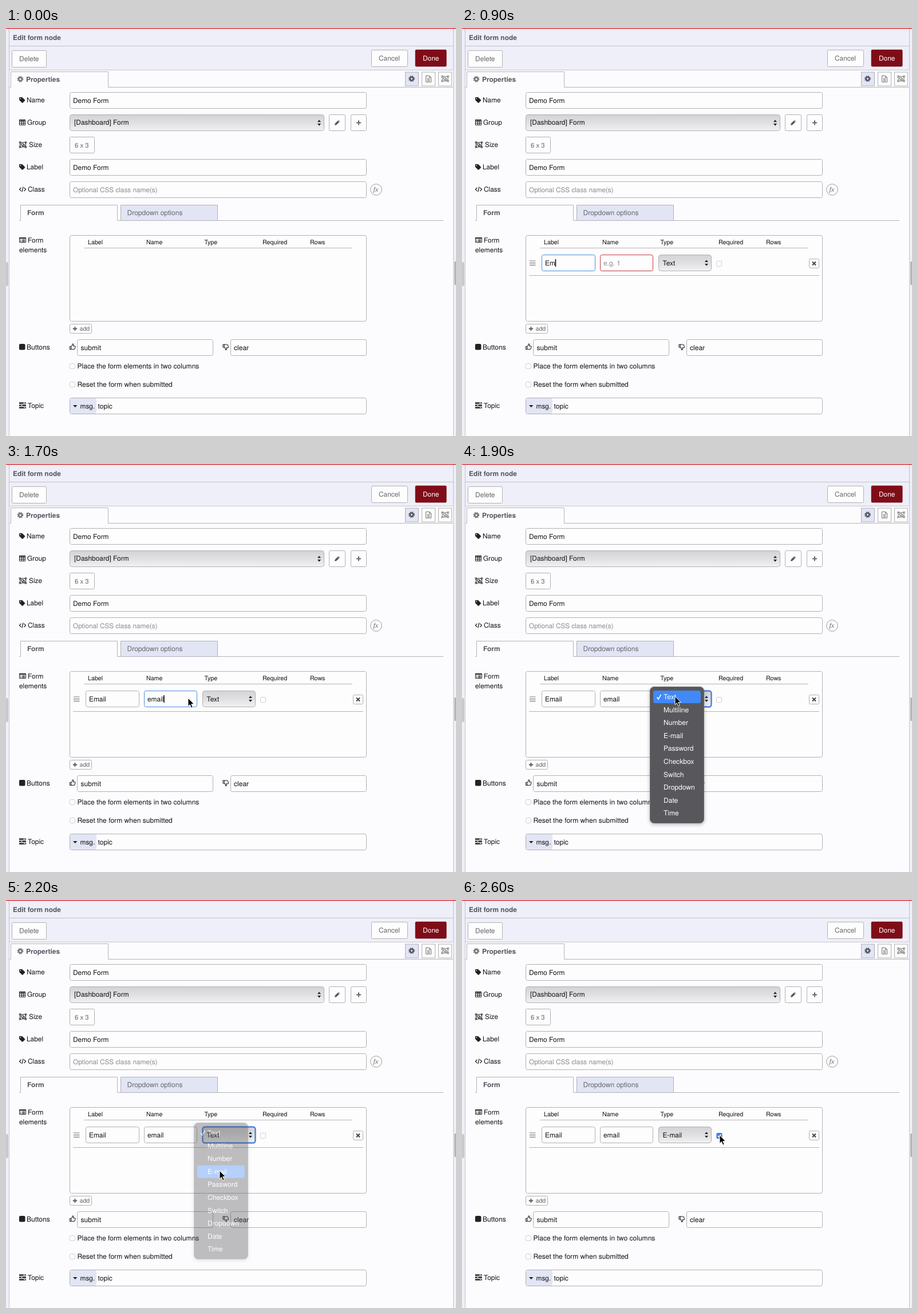
Recreate the animation shown at these times as an HTML page. Size 786 px wide and 713 px high, loop 2700 ms.

```html
<!DOCTYPE html>
<html lang="en">
<head>
<meta charset="utf-8">
<title>Edit form node</title>
<style>
  html, body { margin: 0; width: 100%; height: 100%; overflow: hidden; background: #fcfcfe; }
  svg { display: block; width: 786px; height: 713px; }
  text { font: 11.9px "Helvetica Neue", "Liberation Sans", Arial, sans-serif; fill: #111; white-space: pre; text-rendering: geometricPrecision; }
  .bold { font-weight: bold; fill: #555560; }
  .head { font-size: 10.7px; }
  .soft { fill: #66666c; }
  .hint { fill: #8b8b90; }
  .white { fill: #fff; }
  .wide { font-size: 12.07px; }
  .box { fill: #fdfdfe; stroke: #b1b1b5; }
  .tick { fill: #fdfdfe; stroke: #cfcfd3; }
  .tab { fill: #e2e5f4; stroke: #b1b1ba; }
  .line { fill: none; stroke: #b4b4b9; }
  .ink { fill: none; stroke: #222; }
  .gray { fill: none; stroke: #777; }
</style>
</head>
<body>
<svg id="stage" viewBox="0 0 786 713" xmlns="http://www.w3.org/2000/svg">
  <defs>
    <linearGradient id="metal" x2="0" y2="1">
      <stop offset="0" stop-color="#d3d3d5"/>
      <stop offset=".5" stop-color="#e0e0e2"/>
      <stop offset="1" stop-color="#f1f1f3"/>
    </linearGradient>
    <filter id="shade" x="-20%" y="-10%" width="140%" height="125%">
      <feDropShadow dx="0" dy="2" stdDeviation="3" flood-opacity=".28"/>
    </filter>
    <g id="gear">
      <circle r="2.9" fill="none" stroke="currentColor" stroke-width="2.5"/>
      <circle r="4.5" fill="none" stroke="currentColor" stroke-width="1.8" stroke-dasharray="1.9 1.634"/>
    </g>
    <g id="tag">
      <path d="M0 1Q0 0 1 0H4.4Q5.2 0 6 .8L10 4.8Q10.6 5.5 10 6.1L6.3 9.8Q5.6 10.4 5 9.8L.7 5.6Q0 4.8 0 4Z" fill="#222"/>
      <circle cx="2.3" cy="2.3" r=".9" fill="#fcfcfe"/>
    </g>
    <g id="group" fill="none" stroke="currentColor">
      <path d="M1.5 1.5H11.5V9.5H1.5Z"/>
      <path d="M3.5 3.5H7.5V6.5H3.5ZM5.5 6.5V8H9.5V5H7.5"/>
      <path d="M.2.2H2.6V2.6H.2ZM10.4.2H12.8V2.6H10.4ZM.2 8.4H2.6V10.8H.2ZM10.4 8.4H12.8V10.8H10.4Z" stroke-width=".8"/>
    </g>
    <path id="thumb" d="M.6 5H2.8V10H.6ZM2.8 5.2Q4.8 4 5 1Q5.2.4 6 .6Q7.6 1.4 6.4 4.2H9.2Q10.3 4.6 9.8 5.7Q10 6.8 9.4 7.4Q9.4 8.6 8.7 8.9Q8.5 10 7.4 10H5.4Q4 9.8 2.8 9.2" fill="none" stroke="#222" stroke-width="1.1"/>
    <path id="arrows" d="M0 3.8L3 0L6 3.8ZM0 6.6H6L3 10.4Z" fill="#222"/>
    <path id="plus" d="M-4 0H4M0-4V4" fill="none" stroke="currentColor" stroke-width="2"/>
  </defs>
  <g id="form"></g>
  <g id="row"></g>
  <g id="menu" filter="url(#shade)"></g>
  <path id="pointer" d="M0 0V14.6L3.3 11.5L5.7 17.2L8.2 16.1L5.8 10.6H10.4Z" fill="#000" stroke="#fff" stroke-width="1"/>
</svg>
<script>
const $ = id => document.getElementById(id);
const text = (x, y, s, cls = '', more = '') => `<text x="${x}" y="${y}" class="${cls}" ${more}>${s}</text>`;
const rect = (x, y, w, h, cls = 'box', r = 3, more = '') =>
  `<rect x="${x + .5}" y="${y + .5}" width="${w}" height="${h}" rx="${r}" class="${cls}" ${more}/>`;
const path = (d, cls = 'line', more = '') => `<path d="${d}" class="${cls}" ${more}/>`;
const fill = (x, y, w, h, color, r = 0) => `<rect x="${x}" y="${y}" width="${w}" height="${h}" rx="${r}" fill="${color}"/>`;
const icon = (id, x, y, color = '#222', turn = '') =>
  `<use href="#${id}" transform="translate(${x} ${y}) ${turn}" color="${color}"/>`;
const metal = (x, y, w, h, more = '') => rect(x, y, w, h, '', 4, `fill="url(#metal)" stroke="#b1b1b5" ${more}`);

const frame = [
  fill(0, 0, 786, 713, '#fcfcfe'),
  fill(0, 0, 786, 73, '#eeeff8'),
  fill(0, 0, 5, 713, '#eeeff8'), fill(782, 0, 4, 713, '#eeeff8'),
  path('M5.5 1V713M781.5 1V713M6 31.5H781M6 73.5H781', 'line', 'stroke-opacity=".75"'),
  fill(0, 0, 786, 1.3, '#d81f26'),
  fill(0, 409, 4, 42, '#c8c8ce', 1.5), fill(783, 408, 3, 41, '#b4b4bb', 1),
  text(12, 20.5, 'Edit form node', 'bold'),
  rect(10, 39, 60, 29, 'box', 2), text(23, 58, 'Delete', 'soft wide'),
  rect(638, 38, 63, 29, 'box', 2), text(651, 57, 'Cancel', 'soft'),
  fill(714.7, 37.7, 54.8, 29.8, '#7f0d17', 2), text(728, 57, 'Done', 'white'),
  path('M6 103.5H8.5V76.5H178.5V103.5H781'),
  icon('gear', 25, 89.3, '#777'), text(35, 93.7, 'Properties', 'bold'),
  rect(697, 76.6, 23, 24, 'tab', 0), icon('gear', 708.5, 88.6, '#55555f'),
  rect(726, 76.6, 23, 24, 'box', 0), rect(755, 76.6, 23, 24, 'box', 0),
  path('M733.5 83.5H739.5L742.5 86.5V94.5H733.5ZM739.5 83.5V86.5H742.5M735.5 88.5H740.5M735.5 90.5H740.5M735.5 92.5H740.5', 'gray'),
  icon('group', 760.5, 83.2, '#777')
];

const fields = [
  icon('tag', 23, 121), text(36, 130, 'Name'),
  rect(111, 112, 518, 28), text(117, 131, 'Demo Form'),
  path('M23.5 160.5H33.5V169.5H23.5ZM23.5 163.5H33.5M23.5 166.5H33.5M27.5 161V169M30.5 161V169', 'ink'),
  path('M23 161H34', 'ink', 'stroke-width="2"'), text(37, 169, 'Group'),
  metal(111, 151, 444, 28), text(119, 169, '[Dashboard] Form'),
  icon('arrows', 544, 160.5),
  rect(564, 151, 28, 28, 'box', 2), rect(602, 151, 27, 28, 'box', 2),
  path('M574 170L574.8 166.8L580.6 161L583 163.4L577.2 169.2Z', '', 'fill="#555"'),
  path('M579 161.5L582.5 165', '', 'stroke="#fdfdfe" stroke-width=".8"'),
  icon('plus', 616, 165.5, '#666'),
  icon('group', 23, 198.5), text(40, 208, 'Size'),
  rect(111, 190, 43, 28, 'box', 2), text(120, 208.5, '6 x 3', 'soft', 'style="font-size:11.4px"'),
  icon('tag', 23, 238), text(36, 247, 'Label'),
  rect(111, 229, 518, 28), text(117, 248, 'Demo Form'),
  path('M26.5 279L23.5 282L26.5 285M31.5 279L34.5 282L31.5 285M30 277.5L28 286.5', 'ink', 'stroke-width="1.2"'),
  text(38, 286, 'Class'),
  rect(111, 268, 518, 28), text(117, 287, 'Optional CSS class name(s)', 'hint', 'style="font-size:11.75px"'),
  '<circle cx="646.5" cy="282.5" r="9.8" class="box" style="stroke:#999"/>',
  text(641.5, 286, 'fx', 'soft', 'style="font:italic 12px \'Liberation Serif\',serif"')
];

const elements = [
  path('M23 336.5H25.5V309.5H194.5V336.5H764'), text(37, 327, 'Form', 'bold'),
  rect(200, 309, 169, 27, 'tab', 0), text(211.5, 327, 'Dropdown options', 'soft wide'),
  path('M23.5 366.5H34.5V374.5H23.5ZM25 369.5H26.5M28 369.5H33M25 371.5H26.5M28 371.5H33M25 373H26.5M28 373H33', 'ink'),
  path('M23 367H35', 'ink', 'stroke-width="2"'),
  text(38, 375, 'Form'), text(23, 392, 'elements'),
  rect(111, 362, 518, 150),
  ...[[143, 'Label'], [245, 'Name'], [346.5, 'Type'], [448, 'Required'], [531, 'Rows']].map(([x, s]) => text(x, 377.7, s, 'head')),
  path('M136 384.5H605'),
  rect(111, 517, 38, 16, 'box', 2), icon('plus', 120.5, 525.5, '#555', 'scale(.9)'),
  text(128.5, 529, 'add', 'soft', 'style="font-size:10.6px"')
];

const footer = [
  fill(23, 552, 10.5, 10.5, '#222', 2), text(36, 562, 'Buttons', 'wide'),
  icon('thumb', 111, 551.5), rect(124, 544, 237, 28), text(130.5, 563, 'submit', 'wide'),
  icon('thumb', 378.5, 563, '#222', 'scale(1 -1)'), rect(392, 544, 237, 28), text(398, 563, 'clear', 'wide'),
  rect(111, 586, 9, 9, 'tick', 2), text(124.5, 595, 'Place the form elements in two columns', 'wide'),
  rect(111, 618, 9, 9, 'tick', 2), text(124.5, 627, 'Reset the form when submitted', 'wide'),
  path('M23 655.5H35M23 659.5H35M23 663.5H35', 'ink', 'stroke-width="2.6"'),
  path('M30 655.5H34M26 659.5H29M31 663.5H34', '', 'stroke="#fcfcfe" stroke-width=".9"'),
  text(38, 663.5, 'Topic'),
  rect(111, 646, 518, 28), fill(112, 647, 46, 27, '#e2e5f4', 2),
  path('M117 659H124.5L120.8 663Z', '', 'fill="#222"'), text(129.5, 665, 'msg.'), text(160.5, 665, 'topic', 'wide')
];
$('form').innerHTML = [frame, fields, elements, footer].flat().join('');

const kinds = ['Text', 'Multiline', 'Number', 'E-mail', 'Password', 'Checkbox', 'Switch', 'Dropdown', 'Date', 'Time'];
const pitch = 22.6;

$('row').innerHTML = [
  path('M118 407H128.5M118 410.7H128.5M118 414.4H128.5', 'gray', 'stroke-width="1.2"'),
  rect(139, 396, 93, 28, 'box', 3, 'id="labelBox"'), text(145, 415, '', '', 'id="label"'),
  rect(241, 396, 92, 28, 'box', 3, 'id="nameBox"'), text(247, 415, '', '', 'id="name"'),
  path('', '', 'id="caret" stroke="#000" stroke-width="1.5"'),
  metal(343, 396, 92, 28, 'id="typeBox"'), text(350.5, 414.5, '', '', 'id="type"'), icon('arrows', 424, 405.3),
  rect(444, 407, 9, 9, 'tick', 2),
  `<g id="checked">${fill(444.5, 407, 10, 10, '#3b7fe8', 2)}${path('M446.7 412L448.8 414.4L452.4 409.3', '', 'fill="none" stroke="#fff" stroke-width="1.4"')}</g>`,
  rect(606, 403, 17, 16, 'box', 2), path('M612 408.5L618 414.5M618 408.5L612 414.5', '', 'stroke="#444" stroke-width="2"'),
  path('M117 432.5H624')
].join('');

$('menu').innerHTML = [
  rect(328, 389, 94, 238, '', 7, 'fill="#59595b" stroke="#6d6d70"'),
  '<rect id="pick" x="334" y="396" width="83" height="22" rx="4" fill="#4089f7"/>',
  path('M340.5 407.5L343 411L347.5 403', '', 'fill="none" stroke="#fff" stroke-width="1.6"'),
  ...kinds.map((s, i) => text(352, 411 + i * pitch, s, 'white wide'))
].join('');

// Steps are 100 ms long; each entry holds until the next one.
const steps = {
  label: [[0, ''], [8, 'E'], [9, 'Em'], [10, 'Emai'], [11, 'Email']],
  name: [[0, ''], [14, 'e'], [15, 'ema'], [16, 'email']],
  focus: [[0, ''], [7, 'label'], [13, 'name'], [19, 'type'], [25, '']],
  menu: [[0, 0], [19, 1], [22, .38], [23, 0]],
  pick: [[0, 0], [20, 1], [21, 3]],
  pointer: [[0, null], [1, [133, 530]], [2, [133, 525]], [3, [142, 510]], [4, [166, 469]], [5, [178, 434]], [6, [184, 410]],
    [7, null], [12, [258, 409]], [13, [261, 408]], [14, null], [17, [318, 409]], [18, [367, 408]], [19, [372, 406]],
    [20, [373, 428]], [21, [373, 473]], [23, [394, 454]], [24, [440, 411]], [25, [449, 411]], [26, [450, 411]]]
};
const at = (key, n) => steps[key].filter(s => s[0] <= n).pop()[1];
const show = (id, on) => $(id).setAttribute('visibility', on ? 'inherit' : 'hidden');

function entry(id, value, hint) {
  $(id).textContent = value || hint;
  $(id).setAttribute('class', value ? '' : 'hint');
}

function draw(n) {
  const label = at('label', n), name = at('name', n), focus = at('focus', n);
  const pointer = at('pointer', n), menu = at('menu', n);
  show('row', n >= 2);
  show('checked', n >= 26);
  entry('label', label, 'e.g. Option 1');
  entry('name', name, 'e.g. 1');
  $('type').textContent = n < 23 ? kinds[0] : kinds[3];

  $('labelBox').style.stroke = focus === 'label' ? '#4c8de0' : '';
  $('nameBox').style.stroke = !name ? '#c23a3a' : focus === 'name' ? '#4c8de0' : '';
  $('typeBox').style.stroke = focus === 'type' ? '#4a80e0' : '#b1b1b5';
  $('typeBox').style.strokeWidth = focus === 'type' ? 2.4 : 1;

  const typing = focus === 'label' || focus === 'name';
  show('caret', typing);
  if (typing) {
    const value = focus === 'label' ? label : name;
    const x = (focus === 'label' ? 145 : 247) + (value ? $(focus).getComputedTextLength() : 1) + .6;
    $('caret').setAttribute('d', `M${x} 404V417`);
  }

  show('menu', menu);
  $('menu').setAttribute('opacity', menu);
  $('pick').setAttribute('y', 396 + at('pick', n) * pitch);

  show('pointer', pointer);
  if (pointer) $('pointer').setAttribute('transform', `translate(${pointer})`);
}

const start = performance.now();
function loop(now) {
  draw(Math.floor(Math.max(0, now - start) / 100) % 27);
  requestAnimationFrame(loop);
}
draw(0);
requestAnimationFrame(loop);
</script>
</body>
</html>
```
